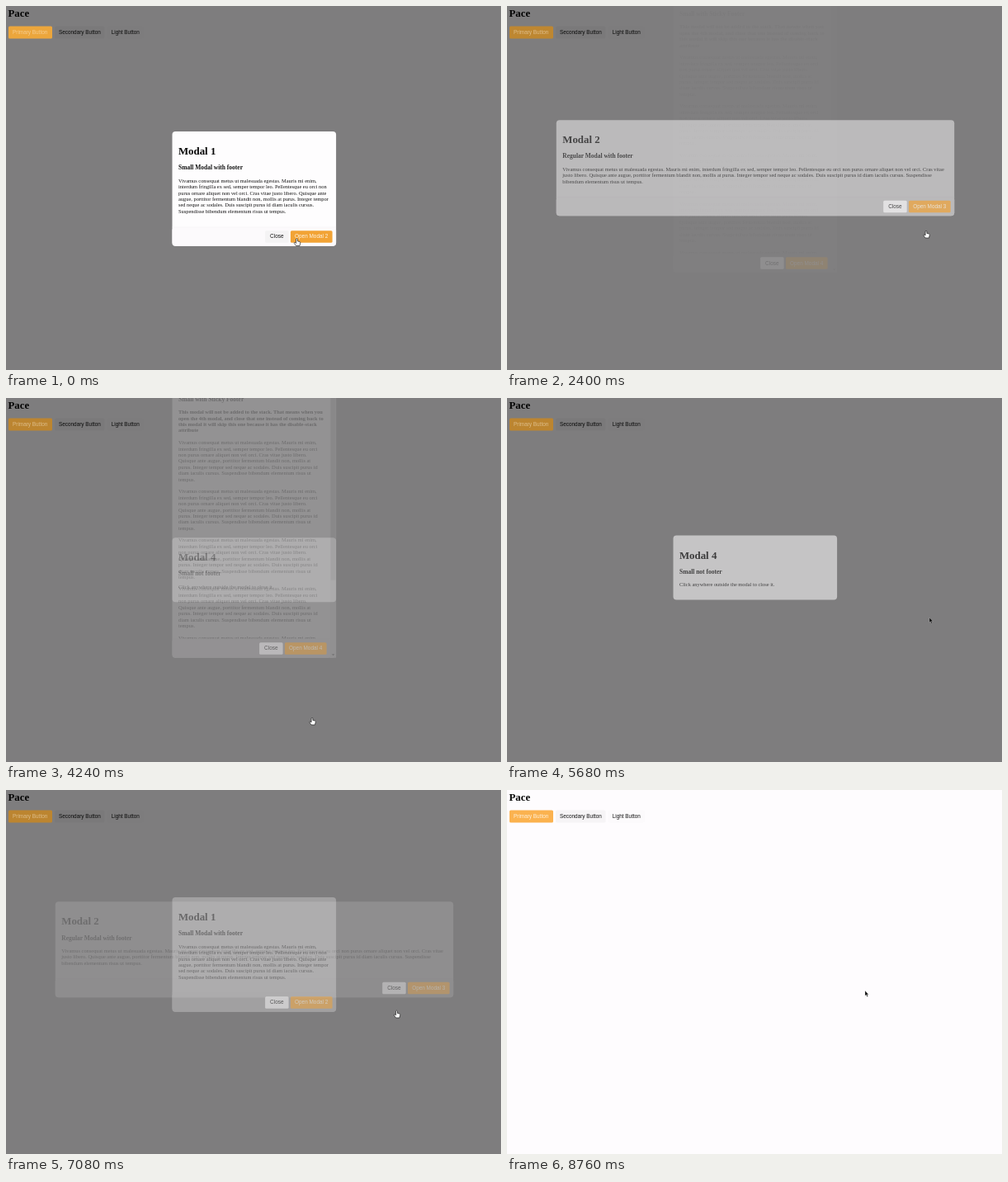
An HTML page that plays this animation: 600x441 px, repeating every 8.8 s.

```html
<!DOCTYPE html>
<html lang="en">
<head>
<meta charset="utf-8">
<title>Stacked modals</title>
<style>
html, body { margin: 0; width: 100%; height: 100%; overflow: hidden; background: #fefcfe; }
svg { display: block; width: 600px; height: 441px; }
text { font: 6.4px "Liberation Serif", "Times New Roman", serif; fill: #141414; white-space: pre; }
.h1 { font-size: 12.85px; font-weight: bold; fill: #080808; }
.h3 { font-size: 7.49px; font-weight: bold; }
.bold { font-weight: bold; }
.btn { font-family: "Liberation Sans", Arial, sans-serif; }
.onPrimary { fill: #fff4e2; }
</style>
</head>
<body>
<svg id="stage" viewBox="0 0 600 441"></svg>
<script>
const LOOP = 8800, CLOSE = 300, OPEN = 400;
const LOREM = ('Vivamus consequat metus ut malesuada egestas. Mauris mi enim, interdum fringilla ex sed, ' +
  'semper tempor leo. Pellentesque eu orci non purus ornare aliquet non vel orci. Cras vitae justo ' +
  'libero. Quisque ante augue, porttitor fermentum blandit non, mollis at purus. Integer tempor sed ' +
  'neque ac sodales. Duis suscipit purus id diam iaculis cursus. Suspendisse bibendum elementum ' +
  'risus ut tempus.').split(' ');
const NOTICE = [
  'This modal will not be added to the stack. That means when you',
  'open the 4th modal, and close that one instead of coming back to',
  'this modal it will skip this one because it has the disable-stack',
  'attribute'];

const stage = document.getElementById('stage');

function add(parent, tag, attrs = {}, content) {
  const el = document.createElementNS('http://www.w3.org/2000/svg', tag);
  for (const k in attrs) el.setAttribute(k, attrs[k]);
  if (content) el.textContent = content;
  return parent.appendChild(el);
}
const box = (parent, x, y, width, height, fill, rx = 0) =>
  add(parent, 'rect', { x, y, width, height, fill, rx });
const label = (parent, x, y, content, cls = '') =>
  add(parent, 'text', { x, y, class: cls }, content);
const lines = (parent, x, y, list, cls) =>
  list.forEach((s, i) => label(parent, x, y + i * 7.43, s, cls));

// Break the paragraph after the given numbers of words
function wrap(counts) {
  let at = 0;
  return [...counts, LOREM.length].map(n => LOREM.slice(at, at += n).join(' '));
}

const clamp = v => Math.max(0, Math.min(1, v));
const lerp = (a, b, k) => a + (b - a) * k;
const mix = (a, b, k) => `rgb(${a.map((v, i) => Math.round(lerp(v, b[i], k)))})`;

// Page
box(stage, 0, 0, 600, 441, '#fefcfe');
label(stage, 2.5, 13.2, 'Pace', 'h1');
box(stage, 59, 24.5, 60.5, 15, '#f6f4f6', 1.5);
label(stage, 64, 34.2, 'Secondary Button', 'btn');
box(stage, 122.5, 24.5, 44.5, 15, '#fcfafc', 1.5);
label(stage, 127.7, 34.2, 'Light Button', 'btn');
const shade = box(stage, 0, 0, 600, 441, '#000');
const primary = box(stage, 3, 24.5, 53, 15, '#fbb24f', 1.5);
const primaryText = label(stage, 8, 34.2, 'Primary Button', 'btn onPrimary');

function modal({ x, y, w, h, title, sub, next, color = '#f2a335', bar = 0, spans, body }) {
  const root = add(stage, 'g');
  const panel = add(root, 'g');
  const buttons = add(root, 'g');
  box(panel, x, y, w, h, '#fefdfe', 4);
  label(panel, x + 7.5, y + 28, title, 'h1');
  label(panel, x + 7.5, y + 46.3, sub, 'h3');
  body(panel, x + 7.5, y + 61.7);
  if (next) {
    const right = x + w - bar, top = y + h - 18.5;
    box(panel, x, y + h - 23, w - bar, 23, '#fcfafc', 4);
    box(panel, x, y + h - 23, w - bar, 0.5, '#f1eff1');
    box(buttons, right - 86, top, 28.5, 14.5, '#f4f3f4', 1.5);
    label(buttons, right - 80, top + 9.2, 'Close', 'btn');
    box(buttons, right - 55.2, top, 50.7, 14.5, color, 1.5);
    label(buttons, right - 50, top + 9.2, next, 'btn onPrimary');
  }
  if (bar) {
    const bx = x + w - bar;
    box(panel, bx, y, bar, h, '#f1f0f1');
    box(panel, bx + 0.4, y + 7, bar - 0.8, 256, '#c1c0c1');
    add(panel, 'path', { d: `M${bx + 1.8} ${y + 4.4}h3.4l-1.7 -2z`, fill: '#8a898a' });
    add(panel, 'path', { d: `M${bx + 1.8} ${y + h - 4.4}h3.4l-1.7 2z`, fill: '#404040' });
  }
  return { root, panel, buttons, h, tinted: !!next };
}

const small = { x: 201.5, w: 198.6 };
const modal4 = modal({ ...small, y: 182, h: 78, title: 'Modal 4', sub: 'Small not footer',
  body: (g, x, y) => label(g, x, y, 'Click anywhere outside the modal to close it.') });
const modal3 = modal({ ...small, y: 43, h: 357, title: 'Modal 3 - Disable-stack',
  sub: 'Small with Sticky Footer', next: 'Open Modal 4', color: '#f29d20', bar: 7,
  body: (g, x, y) => {
    lines(g, x, y - 0.2, NOTICE, 'bold');
    const para = wrap([9, 10, 11, 9, 11, 8]);
    for (let i = 0; i < 5; i++) lines(g, x, y + 36.8 + i * 59.1, i < 4 ? para : para.slice(0, 1));
  } });
const modal2 = modal({ x: 59.8, w: 482.4, y: 163, h: 116, title: 'Modal 2',
  sub: 'Regular Modal with footer', next: 'Open Modal 3',
  body: (g, x, y) => lines(g, x, y, wrap([28, 26])) });
const modal1 = modal({ ...small, y: 152, h: 138.7, title: 'Modal 1',
  sub: 'Small Modal with footer', next: 'Open Modal 2',
  body: (g, x, y) => lines(g, x, y, wrap([9, 11, 12, 10, 11])) });

// [modal, opening starts, closing starts]
const LAST_CLOSE = 8290;
const shows = [
  [modal1, -1000, 710], [modal2, 860, 2244], [modal3, 2394, 3990], [modal4, 4140, 5548],
  [modal2, 5695, 6820], [modal1, 6970, LAST_CLOSE]];

// Pointer
const hand = add(stage, 'path', {
  d: 'M-.9 .9Q0 -.5 .9 .9V3.4L3.6 4.1Q4.4 4.4 4.3 5.3L3.5 9H-.9L-3.1 6Q-3.3 4.7 -2 5L-.9 5.9Z',
  fill: '#fff', stroke: '#222', 'stroke-width': 0.7, 'stroke-linejoin': 'round' });
const arrow = add(stage, 'path', {
  d: 'M0 0V6L1.4 4.8L2.5 7.2L3.5 6.7L2.4 4.4H4.2Z',
  fill: '#0a0a0a', stroke: '#ddd', 'stroke-width': 0.3 });

// [time, x, y]
const track = [
  [0, 352.5, 281.5], [40, 352.5, 281.5], [400, 361, 281], [1280, 361, 281], [2060, 508, 272],
  [2560, 508, 272], [3160, 388, 350], [3480, 371, 387], [4340, 371, 387], [5000, 501, 276],
  [5040, 501, 276], [5080, 512, 266], [6150, 512, 266], [6700, 473.5, 267],
  [7400, 473.5, 267], [7960, 434, 243.3], [LOOP, 434, 243.3]];
const arrowTimes = [[1320, 1900], [2620, 3300], [4400, 6180], [7480, LOOP]];

function pointer(t) {
  const i = track.findIndex((p, n) => n && t <= p[0]);
  const [t0, x0, y0] = track[i - 1], [t1, x1, y1] = track[i];
  const k = (t - t0) / (t1 - t0), e = k * k * (3 - 2 * k);
  const isArrow = arrowTimes.some(([a, b]) => t >= a && t < b);
  const place = `translate(${lerp(x0, x1, e)} ${lerp(y0, y1, e)})`;
  for (const [el, on] of [[hand, !isArrow], [arrow, isArrow]]) {
    el.setAttribute('transform', place);
    el.setAttribute('visibility', on ? 'visible' : 'hidden');
  }
}

function draw(t) {
  const poses = new Map([modal1, modal2, modal3, modal4].map(m => [m, [0, 0]]));
  for (const [m, open, close] of shows) {
    if (t < open || t > close + CLOSE) continue;
    const inn = clamp((t - open) / OPEN), out = clamp((t - close) / CLOSE);
    const lift = t < close ? 0.22 * (1 - inn) : 0.24 * (1 - (1 - out) ** 3);
    poses.set(m, [inn * (1 - out), -lift * m.h]);
  }
  let glow = 0;
  for (const [m, [alpha, dy]] of poses) {
    m.root.setAttribute('visibility', alpha > 0 ? 'visible' : 'hidden');
    m.root.setAttribute('transform', `translate(0 ${dy})`);
    m.panel.setAttribute('opacity', alpha);
    m.buttons.setAttribute('opacity', Math.sqrt(alpha));
    if (m.tinted) glow = Math.max(glow, alpha ** 4);
  }
  const clear = clamp((t - LAST_CLOSE) / 400);
  shade.setAttribute('opacity', 0.5 * (1 - clear));
  const dim = [188, 133, 48].map((v, i) => lerp(v, [236, 166, 60][i], glow));
  primary.setAttribute('fill', mix(dim, [251, 178, 79], clear));
  primaryText.setAttribute('opacity', lerp(0.5, 0.95, clear));
  pointer(t);
}

const start = performance.now();
function tick() {
  draw((performance.now() - start) % LOOP);
  requestAnimationFrame(tick);
}
tick();
</script>
</body>
</html>
```
